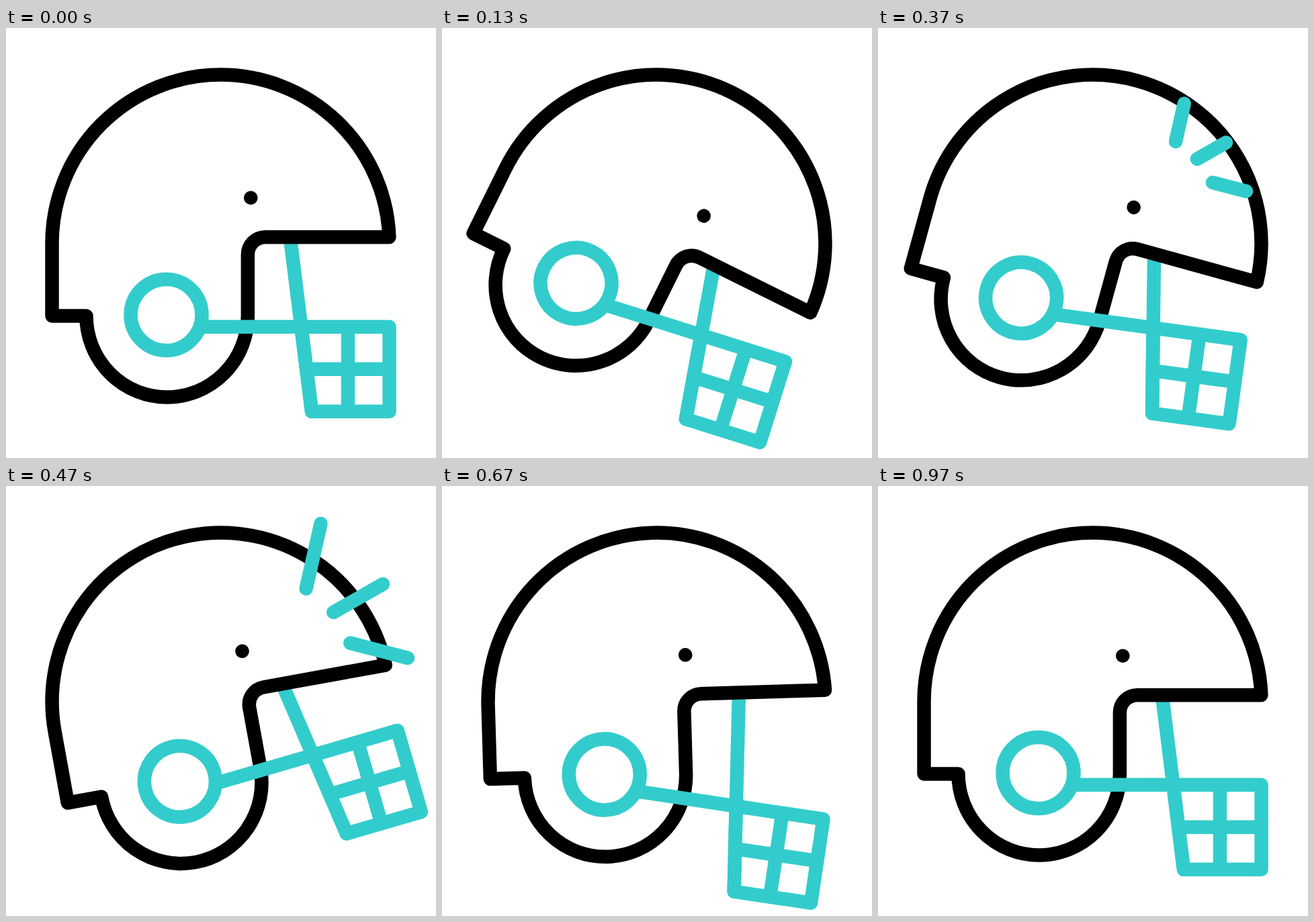
Recreate the animation shown at these times as an HTML page. Size 640 px wide and 640 px high, loop 1670 ms.

```html
<!DOCTYPE html>
<html lang="en">
<head>
<meta charset="utf-8">
<title>Helmet</title>
<style>
  html, body { margin: 0; width: 100%; height: 100%; overflow: hidden; background: #fff; }
  svg { display: block; width: 100vw; height: 100vh; }
  path, line, .ring { fill: none; stroke-width: 20.5; stroke-linecap: round; stroke-linejoin: round; }
  .teal { stroke: #33cccc; }
  .shell { stroke: #000; fill: #fff; }
</style>
</head>
<body>
<svg viewBox="0 0 640 640">
  <g id="helmet">
    <path class="teal cage" d="M455 570.8L414.6 245"/>
    <path class="shell" d="M570.4 311.2A251 251 0 0 0 319.5 69.6A251 251 0 0 0 68.5 320.6V428.5H119.5A120.2 121 0 0 0 359.9 428.5V337.2A26 26 0 0 1 385.9 311.2Z"/>
    <circle cx="364.3" cy="252.7" r="10.3"/>
    <path class="teal cage" d="M295 444.7H570.6V570.8H455L439.3 444.7M509 444.7V570.8M447 507.7H570.6"/>
    <circle class="teal ring" cx="238.5" cy="427" r="53"/>
  </g>
  <g id="burst"></g>
</svg>
<script>
  const LOOP = 1670, LAST = 29;

  // [tick, value] keys, 30 ticks per second, eased in and out between keys
  const tilt = [[0, 0], [7, 43.5], [15, -12.7], [21.5, 0]];
  const swing = [[0, 0], [7, -14.7], [11, -7.6], [12.5, -7.6], [20.5, 10.4], [29, 0]];
  const head = [[9, 0], [13, 1]];
  const tail = [[13, 0], [17.2, 1]];
  const rays = [[443, 169, 468.5, 56], [475, 195, 561, 146], [498, 230, 598, 256]];

  const mix = (a, b, u) => a + (b - a) * u;

  function valueAt(keys, k) {
    if (k <= keys[0][0]) return keys[0][1];
    for (let i = 1; i < keys.length; i++) {
      const [k0, v0] = keys[i - 1], [k1, v1] = keys[i];
      if (k < k1) {
        const u = (k - k0) / (k1 - k0);
        return mix(v0, v1, u * u * (3 - 2 * u));
      }
    }
    return keys[keys.length - 1][1];
  }

  // Ticks fall on whole hundredths of a second
  function tickAt(ms) {
    let k = Math.floor(ms * 3 / 100) + 1;
    while (k > 0 && Math.round(k * 10 / 3) * 10 > ms) k--;
    return Math.min(k, LAST);
  }

  const helmet = document.getElementById('helmet');
  const burst = document.getElementById('burst');
  const cage = document.querySelectorAll('.cage');
  const lines = rays.map(() => {
    const el = document.createElementNS('http://www.w3.org/2000/svg', 'line');
    el.setAttribute('class', 'teal');
    return burst.appendChild(el);
  });

  function draw(ms) {
    const k = tickAt(ms % LOOP);
    helmet.setAttribute('transform', `rotate(${valueAt(tilt, k)} 319.5 320.3)`);
    for (const part of cage) part.setAttribute('transform', `rotate(${valueAt(swing, k)} 238.5 427)`);

    const from = valueAt(tail, k), to = valueAt(head, k);
    burst.setAttribute('visibility', to > from ? 'visible' : 'hidden');
    rays.forEach(([x0, y0, x1, y1], i) => {
      const el = lines[i];
      el.setAttribute('x1', mix(x0, x1, from));
      el.setAttribute('y1', mix(y0, y1, from));
      el.setAttribute('x2', mix(x0, x1, to));
      el.setAttribute('y2', mix(y0, y1, to));
    });
  }

  function frame(now) {
    draw(now);
    requestAnimationFrame(frame);
  }

  draw(0);
  requestAnimationFrame(frame);
</script>
</body>
</html>
```
